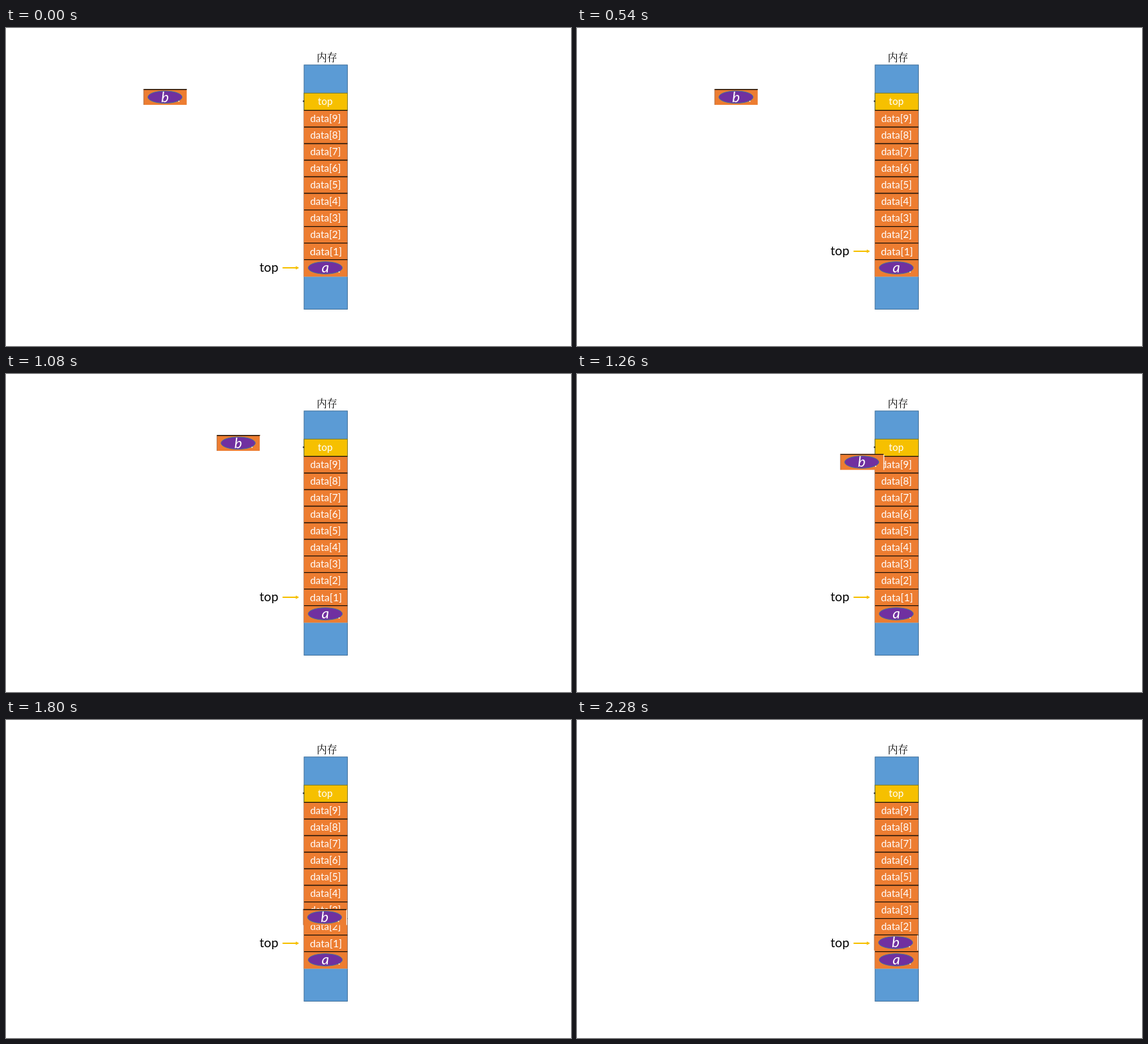
Recreate the animation shown at these times as an HTML page. Size 853 px wide and 480 px high, loop 2340 ms.

```html
<!DOCTYPE html>
<html lang="zh">
<head>
<meta charset="utf-8">
<title>Stack push</title>
<style>
  html, body { margin: 0; width: 100%; height: 100%; overflow: hidden; background: #fff; }
  svg { display: block; width: 853px; height: 480px; }
  text { font-family: Lato, "Noto Sans", sans-serif; text-anchor: middle; }
  .cell { font-size: 15px; fill: #fff; }
  .item { font-size: 22px; font-style: italic; fill: #fff; }
  .title { font-family: "Noto Serif CJK SC", "Noto Sans CJK SC", "Noto Sans CJK", serif; font-size: 15.5px; font-weight: 300; }
  .pointer { font-size: 19.2px; }
  .line { stroke: #1c1208; stroke-width: 1.4; }
</style>
</head>
<body>
<svg viewBox="0 0 853 480">
  <defs>
    <path id="route" d="M0 0H120.5C174.5 0 241 64 241 115.9V231.7"/>
    <g id="oval">
      <ellipse rx="25.8" ry="9.2" fill="#7030a0" stroke="#41719c"/>
      <circle cx="21" cy="6.3" r=".9" fill="#fff"/>
    </g>
  </defs>

  <text class="title" x="484.5" y="50">内存</text>
  <rect x="450" y="55.8" width="65.5" height="368.7" fill="#5b9bd5" stroke="#41719c"/>
  <rect x="449.5" y="124" width="66" height="251.5" fill="#ed7d31"/>
  <path d="M449.5 375.5h66" stroke="#a5a5a5" stroke-width=".8"/>
  <rect x="450" y="98.3" width="65.5" height="26" fill="#f6c000" stroke="#7f7a1c"/>
  <circle cx="449.2" cy="110.5" r="1.2" fill="#333"/>
  <text class="cell" x="482" y="115.6">top</text>
  <g id="cells"></g>
  <use href="#oval" x="482" y="362"/>
  <text class="item" x="482" y="369.3">a</text>

  <g id="pointer">
    <text class="pointer" x="397" y="368.3">top</text>
    <path d="M417.5 362H439" stroke="#f6c000" stroke-width="2"/>
    <path d="M437.5 359.2L442.5 362L437.5 364.8Z" fill="#f6c000"/>
  </g>

  <g id="block">
    <rect x="207.7" y="92" width="65.3" height="24" fill="#ed7d31"/>
    <path class="line" d="M207.7 92.7H273"/>
    <path d="M208 92V116" stroke="#8a6a55" stroke-width=".6"/>
    <path d="M273.4 93V116" stroke="#fff" stroke-width="1.2"/>
    <use href="#oval" x="240" y="104.3"/>
    <text class="item" x="240" y="111.8">b</text>
  </g>
</svg>
<script>
const LOOP = 2340, STEP = 60;
const $ = id => document.getElementById(id);
const route = $("route"), length = route.getTotalLength();

// Clock of the slide: [ms, share of the glide's duration]
const pace = [[605, 0], [900, .225], [1080, .364], [1260, .486], [1500, .615], [1800, .786], [2180, 1]];

const clamp = v => Math.min(1, Math.max(0, v));
const ease = p => p < .5 ? 2 * p * p : 1 - 2 * (1 - p) ** 2;

function progress(ms) {
  const i = pace.findIndex(([t]) => t > ms);
  if (i === 0) return 0;
  if (i < 0) return 1;
  const [t0, p0] = pace[i - 1], [t1, p1] = pace[i];
  return p0 + (p1 - p0) * (ms - t0) / (t1 - t0);
}

function buildCells() {
  let html = "";
  for (let i = 0; i < 10; i++) {
    const y = 124.4 + 25.03 * i, n = 9 - i;
    html += `<path class="line" d="M450 ${y}h65.5"/>`;
    if (n > 1) html += `<text class="cell" x="482.4" y="${y + 17.3}">data[${n}]</text>`;
  }
  html += `<text class="cell" x="483" y="343.4" style="font-size:15.7px">data[1]</text>`;
  $("cells").innerHTML = html;
}

const move = (id, x, y) => $(id).setAttribute("transform", `translate(${x} ${y})`);

function draw() {
  const ms = Math.floor(performance.now() % LOOP / STEP) * STEP;
  move("pointer", 0, -25 * ease(clamp(ms / 500)));
  const p = route.getPointAtLength(length * ease(progress(ms)));
  move("block", p.x, p.y);
  requestAnimationFrame(draw);
}

buildCells();
draw();
</script>
</body>
</html>
```
